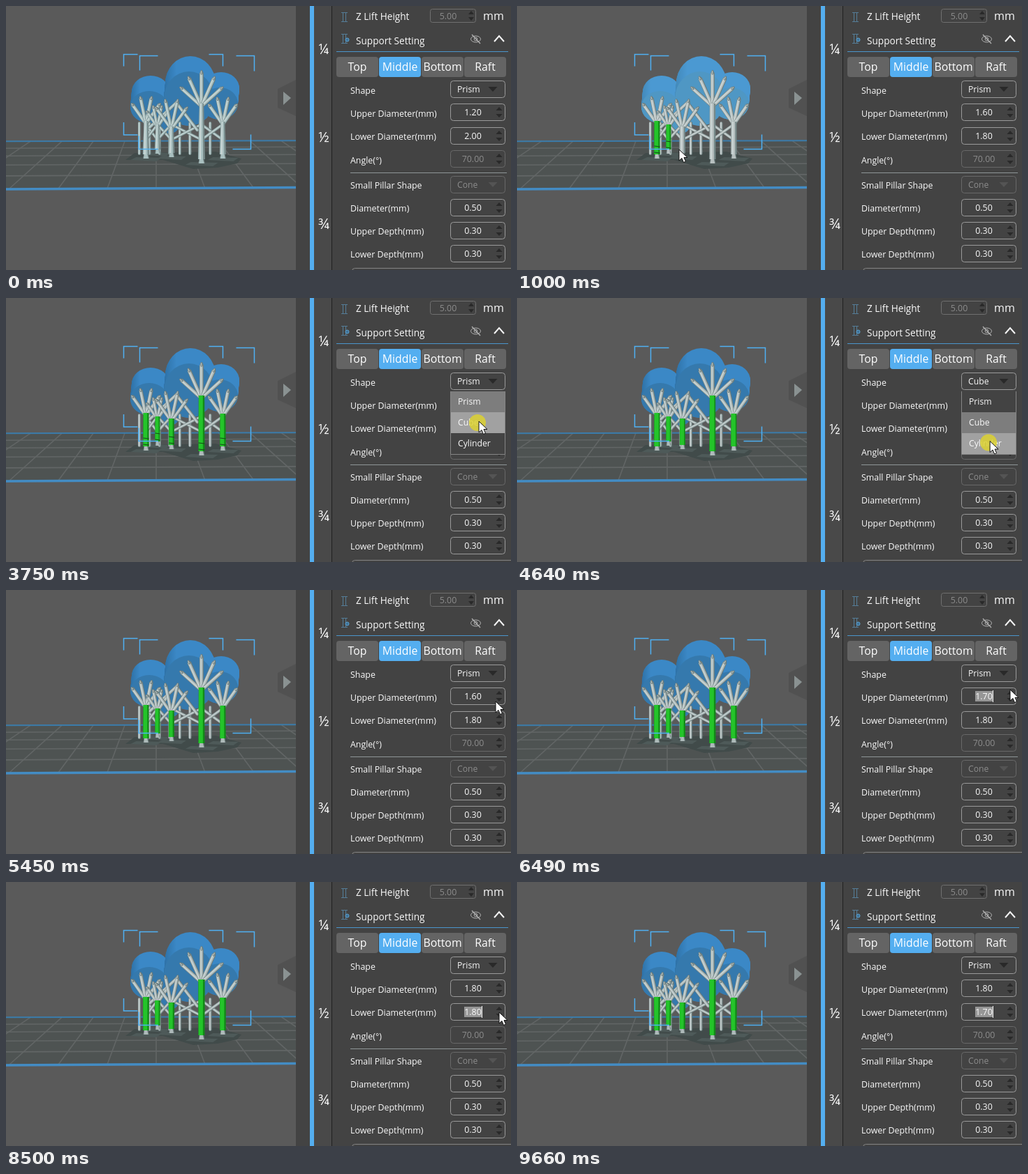
These frames come from a looping animation (723x379 px, 9.99 s). An HTML page with a canvas:

```html
<!DOCTYPE html>
<html lang="en">
<head>
<meta charset="utf-8">
<title>Support settings</title>
<style>
html, body { margin: 0; width: 100%; height: 100%; overflow: hidden; background: #434343; }
canvas { display: block; }
</style>
</head>
<body>
<canvas id="stage" width="723" height="379"></canvas>
<script>
const LOOP = 9990;
const BLUE = '#54aef0';
const g = document.getElementById('stage').getContext('2d');

// ---------- helpers ----------
function rect(x, y, w, h, fill) {
  g.fillStyle = fill;
  g.fillRect(x, y, w, h);
}
function trace(pts) {
  g.beginPath();
  for (let i = 0; i < pts.length; i += 2) g.lineTo(pts[i], pts[i + 1]);
}
function line(pts, color, width = 1) {
  trace(pts);
  g.strokeStyle = color;
  g.lineWidth = width;
  g.stroke();
}
function poly(pts, fill) {
  trace(pts);
  g.fillStyle = fill;
  g.fill();
}
function oval(x, y, rx, ry, fill, stroke) {
  g.beginPath();
  g.ellipse(x, y, rx, ry, 0, 0, 2 * Math.PI);
  if (fill) { g.fillStyle = fill; g.fill(); }
  if (stroke) { g.strokeStyle = stroke; g.lineWidth = 1; g.stroke(); }
}
function round(x, y, w, h, r, fill, stroke) {
  g.beginPath();
  g.roundRect(x, y, w, h, r);
  if (fill) { g.fillStyle = fill; g.fill(); }
  if (stroke) { g.strokeStyle = stroke; g.lineWidth = 1; g.stroke(); }
}
function text(str, x, y, size, color = '#fafafa', align = 'left') {
  g.font = `${size}px "Open Sans", "Noto Sans", sans-serif`;
  g.textAlign = align;
  g.fillStyle = color;
  g.fillText(str, x, y);
}
// Last value whose start time has passed.
function at(t, steps) {
  let value = steps[0][1];
  for (const [start, v] of steps) if (t >= start) value = v;
  return value;
}

// ---------- timeline ----------
const SHAPES = ['Prism', 'Cube', 'Cylinder'];
const OPEN = [[0, false], [3270, true], [3820, false], [4250, true], [4700, false], [4930, true], [5450, false]];
const SHAPE = [[0, 0], [3820, 1], [4700, 2], [5450, 0]];
const UPPER = [[0, 1.2], [640, 1.6], [6080, 1.7], [6560, 1.8]];
const LOWER = [[0, 2], [640, 1.8], [7570, 1.9], [8400, 1.8], [8900, 1.7]];
const CLICKS = [3750, 4640];

const ENTER = 310, LEAVE = 9430;
const under = x => [x, 206];
const item = i => [677, 148 + 29 * i];
const combo0 = [694, 122];
// Arrival times and the spots the pointer visits.
const STOPS = [
  [ENTER, [228, 311]], [640, under(201)], [840, under(216)], [1000, under(232)], [1580, under(280)],
  [1910, under(312)], [3190, combo0], [3480, item(1)], [4080, combo0], [4500, item(2)],
  [4880, combo0], [5180, item(0)], [5450, [701, 160]], [5720, [706, 143]], [7370, [709, 178]], [8080, [706, 187]]
];

function pointer(t) {
  let [x, y] = STOPS[0][1];
  for (const [end, [tx, ty]] of STOPS) {
    const time = 100 + 1.75 * Math.hypot(tx - x, ty - y);
    let k = Math.min(1, (t - end + time) / time);
    if (k <= 0) break;
    k = k * k * (3 - 2 * k);
    x += (tx - x) * k;
    y += (ty - y) * k;
  }
  return [x, y];
}

// ---------- 3D view ----------
// Perspective floor: depth 1 is the near edge, FAR the back edge.
const FAR = 1.56;
const floorY = d => 72 + 190 / d;

function plate() {
  const back = floorY(FAR);
  poly([0, back, 415, back - 1, 415, 261, 0, 263], '#4e5352');
  for (let i = 1; i < 5; i++) {
    const y = floorY(1 + i * (FAR - 1) / 5);
    line([0, y + 1, 415, y - 1], '#626666', 1.6);
  }
  for (let i = -5; i < 5; i++) line([215 + i * 70 / FAR, back, 215 + i * 70, 262], '#626666', 1.6);
  line([0, back + .5, 415, back - .5], '#3b7cab', 2);
  line([0, 263, 415, 260.5], '#438cc4', 3.4);
}

// Each lobe is an ellipse swept upward, then capped by its front face.
const LOBES = [[205, 145, 27, 23], [306, 140, 26, 23], [234, 168, 15, 15], [262, 133, 36, 39]];

function cloud(light) {
  const [dark, side, face] = light ? ['#4288b8', '#4b99d2', '#4f97c4'] : ['#2d70a5', '#3b88c6', '#3579ad'];
  for (const [x, y, rx, ry] of LOBES) {
    const shade = g.createLinearGradient(x - rx, 0, x + rx, 0);
    shade.addColorStop(0, dark);
    shade.addColorStop(.25, side);
    for (let d = 22; d >= 0; d--) oval(x + d / 11, y - d, rx, ry, shade);
  }
  for (const lobe of LOBES) oval(...lobe, face);
}

function limb(x0, y0, x1, y1, w, color) {
  g.lineCap = 'round';
  line([x0, y0, x1, y1], '#6a7b7b', w + 1);
  line([x0 - .4, y0, x1 - .4, y1], color, w - .4);
  line([x0 - w * .2, y0, x1 - w * .2, y1], '#cfdad9', w * .25);
  g.lineCap = 'butt';
}

// Trunks from left to right; they are picked in this order.
const TREES = [
  { x: 200.5, top: 165, foot: 219, size: 1, reach: 34, limbs: 4 },
  { x: 217, top: 170, foot: 212, size: .85, reach: 26, limbs: 4 },
  { x: 237, top: 173, foot: 217, size: .95, reach: 38, limbs: 4 },
  { x: 280, top: 140, foot: 226, size: 1.06, reach: 43, limbs: 5 },
  { x: 310.5, top: 166, foot: 219, size: 1, reach: 34, limbs: 4 }
];
const pickTime = i => 640 + 330 * i;

function crown({ x, top, size, reach, limbs }, color) {
  for (let i = 0; i < limbs; i++) {
    const a = (i - (limbs - 1) / 2) * .46;
    const r = reach * (1 - Math.abs(a) * .2);
    const dx = Math.sin(a) * r, dy = -Math.cos(a) * r;
    limb(x, top + 4, x + dx, top + dy, 4.4 * size, color);
    limb(x + dx, top + dy, x + dx * 1.08, top + dy * 1.08, 2.2, '#94a0a0');
  }
}

function trunk({ x, top, foot, size }, picked, t, color) {
  const a = at(t, UPPER) * 2.35 * size, b = at(t, LOWER) * 2.25 * size;
  const low = foot - 6;
  const split = [.45, .6, .3][at(t, SHAPE)];
  const strip = (l, r, fill) => poly([x + a * l, top, x + a * r, top, x + b * r, low, x + b * l, low], fill);

  poly([x - b, foot, x - b * .65, low - 2, x + b * .65, low - 2, x + b, foot], '#718181');
  poly([x - b + 1, foot, x - b * .6, low, x + b * .4, low, x + b - 1, foot], color);
  strip(-1.05, 1.05, picked ? '#128a18' : '#778a8a');
  strip(-1, split, picked ? '#24c42a' : color);
  if (!picked) strip(-.6, -.2, '#cfdad9');
  if (picked && t < 3820)
    for (const y of [low - 3, low - 12]) line([x - b, y, x + b, y + 1], '#17481a', 1.2);
}

function shadows() {
  poly([171, 221, 184, 211, 300, 209, 337, 219, 331, 226, 303, 232, 268, 234, 225, 221], '#414b4a');
  for (const { x, foot, size } of TREES) {
    const w = 22 * size;
    poly([x - w, foot + 2, x - w + 8, foot - 2, x + w, foot - 1, x + w - 7, foot + 4], '#4e5a59');
  }
}

function supports(t) {
  const color = at(t, [[0, '#a9c0c0'], [450, '#b7c0c0'], [2450, '#aebaba']]);
  shadows();
  for (let x = 191; x < 300; x += 14.5) limb(x, 168, x, 212, 3.2, color);
  TREES.forEach((tree, i) => {
    const next = TREES[i + 1];
    if (!next) return;
    limb(tree.x, 170, next.x, 192, 3.2, color);
    limb(tree.x, 192, next.x, 170, 3.2, color);
  });
  limb(244, 139, 274, 178, 4, color);
  limb(245, 138, 206, 174, 4, color);
  TREES.forEach((tree, i) => {
    crown(tree, color);
    trunk(tree, t >= pickTime(i), t, color);
  });
}

// Corner mark with arms of signed length w and h.
const corner = (x, y, w, h) => line([x + w, y, x, y, x, y + h], '#4fb1f3', 1.5);

function view(t) {
  g.save();
  g.beginPath();
  g.rect(0, 0, 415, 379);
  g.clip();
  rect(0, 0, 415, 379, '#5a5a5a');
  plate();
  corner(168.5, 69.5, 20, 17);
  corner(310.5, 69.5, -20, 17);
  corner(168.5, 185, 20, -18);
  cloud(t >= 450 && t < 2450);
  supports(t);
  corner(191.5, 71.5, 26, 21);
  corner(355.5, 71.5, -26, 22);
  corner(190, 205.5, 28, -19);
  corner(350.5, 205.5, -26, -21);
  poly([415, 106, 389, 119, 389, 146, 415, 158], '#515151');
  poly([397, 123, 408, 132, 397, 142], '#8a9292');
  g.restore();
}

// ---------- panel ----------
const GRAY = '#8c8c8c', DARK = '#292929';
const rowTop = i => Math.round(107 + 33.3 * i);
const lowTop = i => 244 + 33 * i;

function arrow(x, y, w, h, color = DARK) {
  poly([x - w, y, x + w, y, x, y + h], color);
}
function field(y, off) {
  round(636.5, y + .5, 78, 24, 4, '#434343', off ? '#686868' : '#9a9a9a');
}
function spinner(y, value, { off, focus, caret } = {}) {
  field(y, off);
  if (focus) rect(656, y + 5, 25, 15, '#969696');
  text(value, 668.5, y + 17, 12.4, off ? GRAY : '#fafafa', 'center');
  if (focus && caret) rect(681, y + 4, 1, 17, '#f0f0f0');
  arrow(706, y + 10, 4.5, -5);
  arrow(706, y + 15, 4.5, 5);
}
function combo(y, value, off) {
  field(y, off);
  text(value, 646, y + 16.5, 12.2, off ? GRAY : '#fafafa');
  arrow(697, y + 9, 6.5, 7, off ? '#545454' : DARK);
}
function pillarIcon(y, dot) {
  const c = '#557d98';
  for (const dy of [0, 13]) line([480, y + dy, 489, y + dy], c);
  for (const x of [482.5, 486.5]) line([x, y, x, y + 13], c);
  if (dot) oval(488.5, y + 8, 2.5, 2.5, '#3d7299', '#5fa5d3');
}

function header() {
  pillarIcon(9.5, false);
  text('Z Lift Height', 501, 20, 13.6);
  round(607.5, 4.5, 65, 19, 3, null, '#707070');
  text('5.00', 633, 19, 12.4, GRAY, 'center');
  arrow(666, 12, 4, -5);
  arrow(666, 16, 4, 5);
  text('mm', 683, 20, 16);

  pillarIcon(40.5, true);
  text('Support Setting', 501, 55, 13.6);
  oval(672.5, 47.5, 7, 4.5, null, '#b5b5b5');
  oval(672.5, 47.5, 2.3, 2.3, null, '#b5b5b5');
  line([667, 41, 679, 54], '#b5b5b5', 1.2);
  line([699, 51, 706, 43, 713, 51], '#f5f5f5', 2);
  rect(473, 65, 246, 1, '#4a96cc');

  ['Top', 'Middle', 'Bottom', 'Raft'].forEach((name, i) => {
    const x = 473 + 61 * i;
    round(x, 73, 60, 29, 4, i === 1 ? BLUE : '#646464');
    text(name, x + 30, 93, 15.8, '#fff', 'center');
  });
}

function panel(t, [, py]) {
  rect(415, 0, 308, 379, '#434343');
  rect(435, 0, 6, 379, BLUE);
  rect(441, 0, 25, 379, '#494949');
  rect(466, 0, 1, 379, '#202020');
  ['¼', '½', '¾'].forEach((s, i) => text(s, 455, 69 + 125.5 * i, 20, '#fff', 'center'));
  header();

  ['Shape', 'Upper Diameter(mm)', 'Lower Diameter(mm)', 'Angle(°)']
    .forEach((name, i) => text(name, 493, 126 + 33.2 * i, 12.4));
  ['Small Pillar Shape', 'Diameter(mm)', 'Upper Depth(mm)', 'Lower Depth(mm)']
    .forEach((name, i) => text(name, 493, 262 + 33 * i, 12.4));
  rect(493, 239, 224, 1, '#8e9698');

  const shape = at(t, SHAPE);
  combo(rowTop(0), SHAPES[shape]);
  spinner(rowTop(1), at(t, UPPER).toFixed(2), { focus: t >= 6080 && t < 7570, caret: true });
  spinner(rowTop(2), at(t, LOWER).toFixed(2), { focus: t >= 7570, caret: t < 9460 || t >= 9660 });
  spinner(rowTop(3), '70.00', { off: true });
  combo(lowTop(0), 'Cone', true);
  ['0.50', '0.30', '0.30'].forEach((v, i) => spinner(lowTop(i + 1), v));
  round(495.5, 376.5, 240, 20, 4, null, '#858585');
  if (at(t, OPEN)) menu(Math.floor((py - 134) / 30), shape);
}

function menu(hover, shape) {
  rect(637, 134, 77, 91, '#434343');
  SHAPES.forEach((name, i) => {
    const y = 134 + i * 30;
    if (i === hover) rect(637, y, 77, 30, '#a1a1a1');
    else if (i === shape) rect(637, y, 77, 30, '#7d7d7d');
    text(name, 647, y + 19, 12.2);
  });
  line([636.5, 134, 636.5, 224.5, 714.5, 224.5, 714.5, 134], '#858585');
}

function cursor(t, [x, y]) {
  if (t < ENTER || t >= LEAVE) return;
  if (CLICKS.some(c => t >= c && t < c + 70)) oval(x - 2, y + 2, 12, 12, 'rgba(222,211,45,.82)');
  const tip = [0, 0, 0, 16, 4, 12.5, 6.5, 18.5, 9.5, 17.2, 7, 11.5, 12, 11.5];
  const pts = tip.map((v, i) => v + (i % 2 ? y : x));
  poly(pts, '#fff');
  line([...pts, x, y], '#111');
}

function frame(now) {
  const t = now % LOOP;
  const p = pointer(t);
  view(t);
  panel(t, p);
  cursor(t, p);
  requestAnimationFrame(frame);
}
requestAnimationFrame(frame);
</script>
</body>
</html>
```
